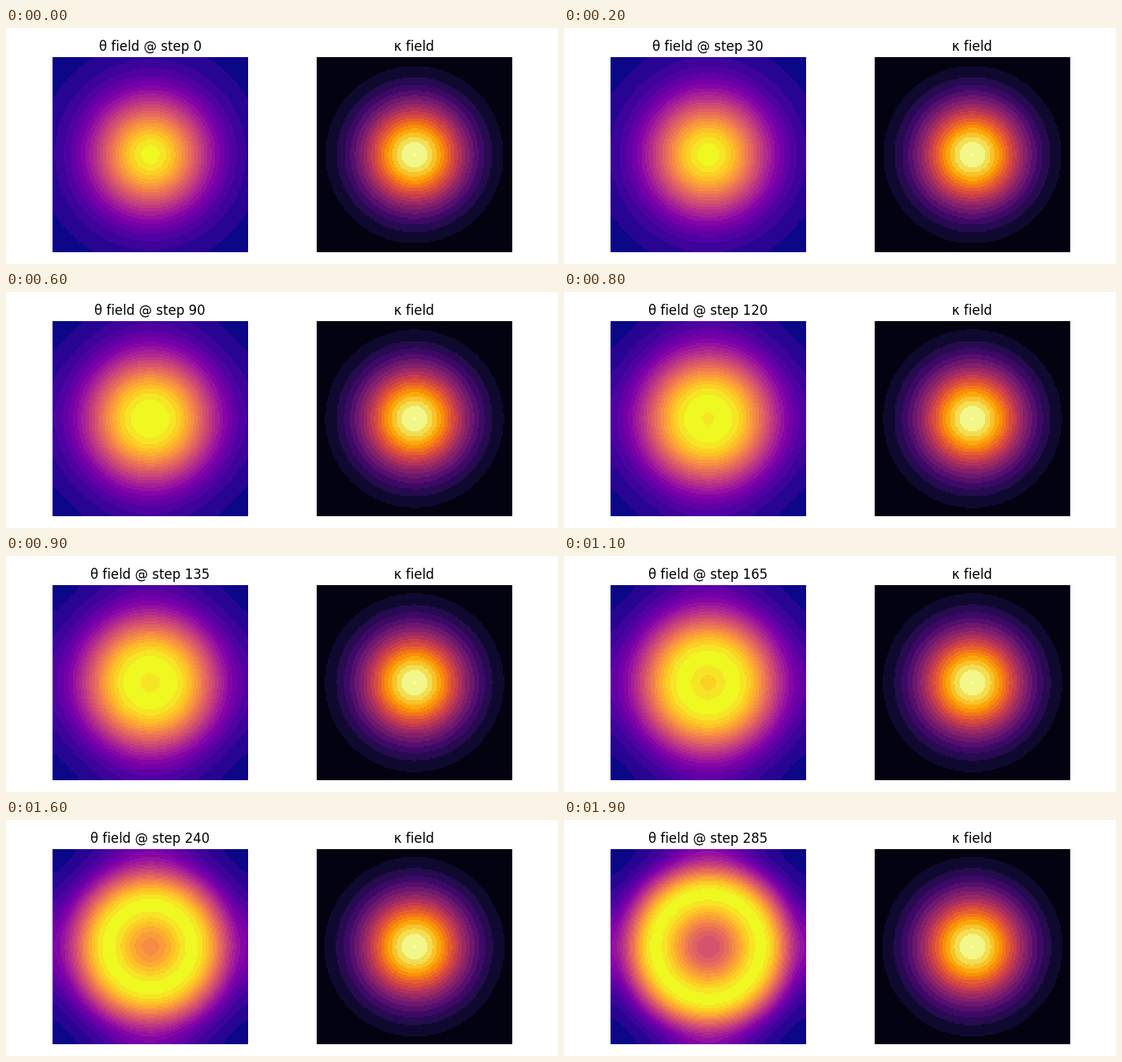
A matplotlib script for the animation above (2 s loop, 700 px wide and 300 px high).

```python
from itertools import product

import numpy as np
import matplotlib.pyplot as plt
from matplotlib.animation import FuncAnimation

FRAMES, INTERVAL, STEP = 20, 100, 15
LAST = (FRAMES - 1) * STEP
CELLS, SIDE = 124, 248

axis = (np.arange(CELLS) + 0.5) * SIDE / CELLS - SIDE / 2
X, Y = np.meshgrid(axis, axis)


def normalise(v):
    return (v - v.min()) / (v.max() - v.min())


def ring(r, u):
    """Round bump whose crest moves outward while its middle sinks."""
    crest = 67 * u ** 1.4
    spread = 53 - 23 * u ** 2
    centre = 1 - 0.47 * u ** 3.2
    outer = np.exp(-0.5 * ((r - crest) / spread) ** 2)
    q = np.minimum(r / max(crest, 1e-6), 1)
    inner = 1 - (1 - centre) * (1 - q ** 2) ** 2
    return np.where(r < crest, inner, outer)


def theta(step):
    u = step / LAST
    field = 0
    # neighbours leak in across the periodic borders
    for i, j in product((-1, 0, 1), repeat=2):
        weight = 0.8 * u if i or j else 1
        field = field + weight * ring(np.hypot(X + i * SIDE, Y + j * SIDE), u)
    return np.round(normalise(field) * 22) / 22


def kappa(step):
    spread = 47 + 0.7 * step / LAST
    field = normalise(np.exp(-0.5 * (X ** 2 + Y ** 2) / spread ** 2))
    return (np.floor(field * 18) + 0.5) / 18


def panel(ax, field, cmap, label):
    ax.axis("off")
    ax.set_title(label)
    return ax.imshow(field, cmap=cmap, vmin=0, vmax=1, interpolation="nearest")


def theta_label(step):
    return f"θ field @ step {step}"


plt.rcParams["font.family"] = "DejaVu Sans"
fig, (ax_t, ax_k) = plt.subplots(1, 2, figsize=(7, 3), dpi=100)
im_t = panel(ax_t, theta(0), "plasma", theta_label(0))
im_k = panel(ax_k, kappa(0), "inferno", "κ field")
fig.tight_layout()


def update(i):
    step = i * STEP
    im_t.set_data(theta(step))
    im_k.set_data(kappa(step))
    ax_t.set_title(theta_label(step))
    return im_t, im_k


anim = FuncAnimation(fig, update, frames=FRAMES, interval=INTERVAL,
                     repeat=True, repeat_delay=0, blit=False)
plt.show()
```
